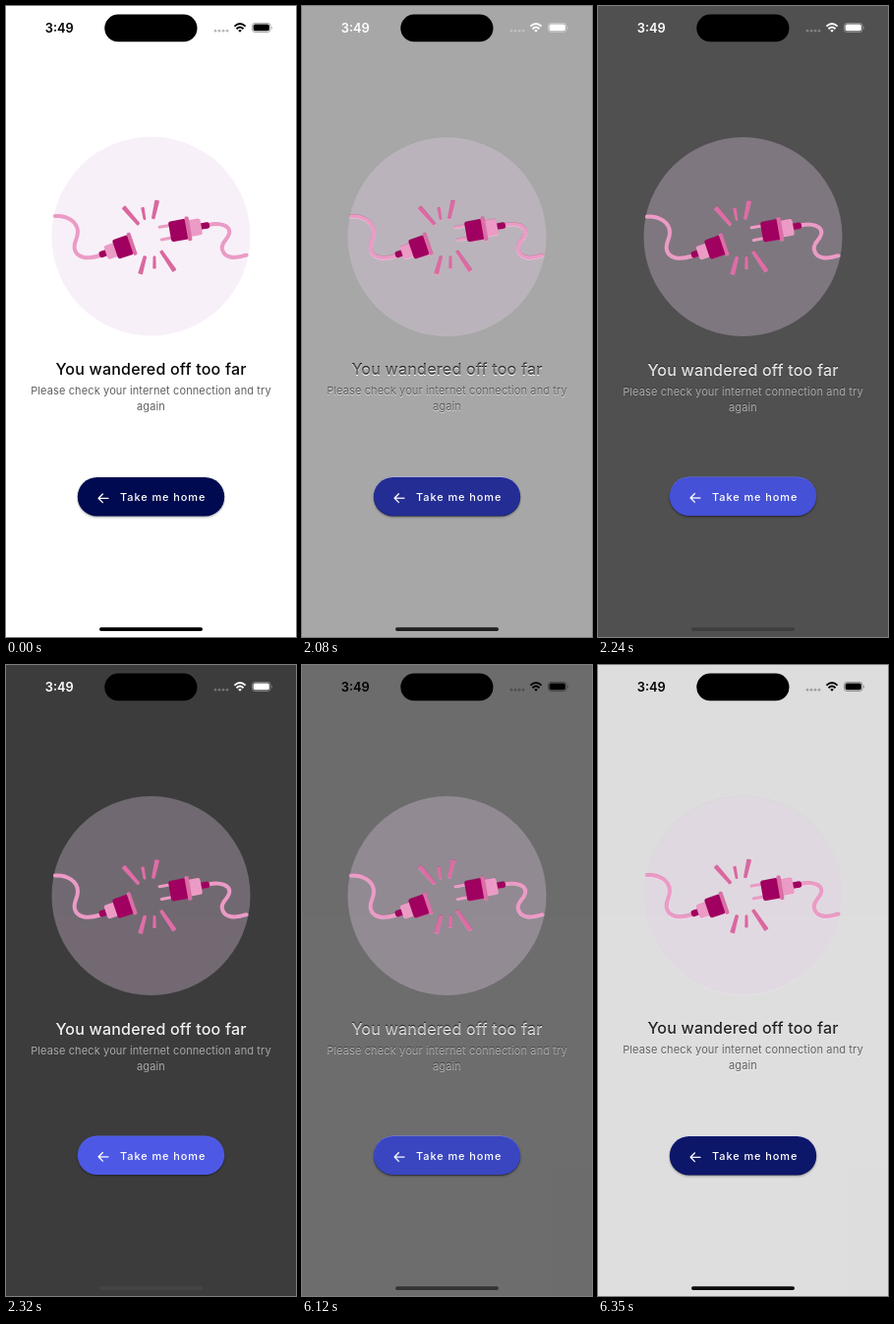
Recreate the animation shown at these times as an HTML page. Size 295 by 640 pixels, loop 6430 ms.

```html
<!DOCTYPE html>
<html lang="en">
<head>
<meta charset="utf-8">
<title>You wandered off too far</title>
<style>
  html, body { margin: 0; width: 100%; height: 100%; overflow: hidden; background: #fff; }
  svg { display: block; width: 100%; height: 100%; }
  text { font-family: Inter, "Open Sans", sans-serif; }
  .light {
    --bg: #fff; --disc: #f8f0f8; --title: #050505; --body: #606060;
    --button: #000a50; --spark: #d9689f; --home: #000;
  }
  .dark {
    --bg: #2f2f2f; --disc: #686068; --title: #fff; --body: #a9a9a9;
    --button: #5360f0; --spark: #e06ea8; --home: #4a4a4a;
  }
  .bg { fill: var(--bg); }
  .disc { fill: var(--disc); }
  .title { fill: var(--title); font-size: 16px; font-weight: 500; letter-spacing: .2px; text-anchor: middle; }
  .body { fill: var(--body); font-size: 11px; letter-spacing: .12px; text-anchor: middle; }
  .button { fill: var(--button); filter: drop-shadow(0 1px 1px rgba(0, 0, 0, .35)); }
  .label { fill: #fff; font-size: 11px; font-weight: 500; letter-spacing: .9px; }
  .arrow { fill: none; stroke: #fff; stroke-width: 1.3; stroke-linecap: round; stroke-linejoin: round; }
  .cord { fill: none; stroke: #eb9bc5; stroke-width: 4; stroke-linecap: round; }
  .pink { fill: #eb9bc5; }
  .rim { fill: #db6fa6; }
  .plum { fill: #a0005f; }
  .spark { fill: var(--spark); stroke: var(--spark); stroke-width: 2; stroke-linejoin: round; }
  .home { fill: var(--home); }
  .clock { font-size: 12.8px; font-weight: 600; }
</style>
</head>
<body>
<svg id="stage" viewBox="0 0 295 640" xmlns="http://www.w3.org/2000/svg"></svg>
<script>
const LOOP = 6430;

// A rounded bar, slightly wider at its outer end.
function spark(x1, y1, x2, y2, wide, narrow) {
  const length = Math.hypot(x2 - x1, y2 - y1);
  const nx = (y1 - y2) / length, ny = (x2 - x1) / length;
  const corner = (x, y, offset) => `${x + nx * offset},${y + ny * offset}`;
  const points = [
    corner(x1, y1, wide), corner(x2, y2, narrow),
    corner(x2, y2, -narrow), corner(x1, y1, -wide)
  ];
  return `<polygon class="spark" points="${points.join(' ')}"/>`;
}

// A block centred on the plug's axis.
const block = (kind, x, width, height, radius) =>
  `<rect class="${kind}" x="${x}" y="${-height / 2}" width="${width}" height="${height}" rx="${radius}"/>`;

const illustration = `
  <path class="cord" d="M50 213C62 212 73 219 73 229C73 237 68 240 70 247C72 255 82 257.5 96 253"/>
  <path class="cord" d="M206 222C218 219 229 223 227 231C225 238 218 240 220 247C222 255 231 257 244.5 252.7"/>
  <g transform="translate(95 252.7) rotate(-19)">
    ${block('plum', 0, 10, 6.5, 2.5)}
    ${block('pink', 7, 12, 14.5, 2.5)}
    ${block('plum', 17, 17, 20.5, 2.5)}
    ${block('rim', 33, 4, 24, 1.6)}
  </g>
  <g transform="translate(176 227.5) rotate(-10)">
    <path d="M-19 -6.6H-7M-19 6.2H-7" stroke="#eb9bc5" stroke-width="3" stroke-linecap="round"/>
    ${block('plum', 21, 10.5, 6.5, 2.5)}
    ${block('pink', 10, 13, 17, 2.5)}
    ${block('plum', -9.5, 18, 21, 2.5)}
    ${block('rim', 7.5, 4.2, 25, 1.6)}
  </g>
  ${spark(120, 204.5, 134.5, 221, 1.4, .8)}
  ${spark(139, 205, 141, 216, .7, .4)}
  ${spark(153.6, 198, 149.8, 215, 1.4, .8)}
  ${spark(136.8, 271, 141.3, 254.5, 1.4, .8)}
  ${spark(151, 265.5, 151, 254.5, .7, .4)}
  ${spark(171, 268, 158, 249, 1.4, .8)}`;

// Light and dark layouts differ by a fraction of a pixel.
const screen = (theme, drop, lift) => `
  <g class="${theme}" id="${theme}">
    <rect class="bg" width="295" height="640"/>
    <g transform="translate(0 ${drop / 2})">
      <circle class="disc" cx="147.5" cy="233.5" r="101"/>
      ${illustration}
    </g>
    <text class="title" x="147.5" y="${374 + drop}">You wandered off too far</text>
    <text class="body" x="147.5" y="${394.3 + drop}">Please check your internet connection and try</text>
    <text class="body" x="147.5" y="${410.3 + drop / 2}">again</text>
    <g transform="translate(0 ${-lift})">
      <rect class="button" x="72.8" y="478" width="149.4" height="39.6" rx="19.8"/>
      <path class="arrow" d="M104 499.3H94.2M98.4 495L94.1 499.3L98.4 503.6"/>
    </g>
    <text class="label" x="116" y="502">Take me home</text>
    <rect class="home" x="95" y="630.2" width="105" height="3.8" rx="1.9"/>
  </g>`;

const dots = [213, 217, 221, 225]
  .map(x => `<circle cx="${x}" cy="25.2" r="1.35"/>`).join('');

const statusBar = `
  <g id="status" fill="currentColor" color="#000">
    <text class="clock" x="39.8" y="26.8">3:49</text>
    <g opacity=".28">${dots}</g>
    <g fill="none" stroke="currentColor" stroke-width="1.9">
      <path d="M232.4 20.6Q238 15.4 243.6 20.6"/>
      <path d="M234.5 23.2Q238 20 241.5 23.2"/>
    </g>
    <path d="M236.2 24.8Q238 23.4 239.8 24.8L238 26.8Z"/>
    <rect x="250.4" y="17.4" width="18.6" height="9" rx="2.8" fill="none" stroke="currentColor" stroke-width=".9" opacity=".4"/>
    <rect x="251.6" y="18.6" width="16.2" height="6.6" rx="1.7"/>
    <path d="M270 20.4Q271.5 21.9 270 23.4Z" opacity=".45"/>
  </g>
  <rect x="100.3" y="8.6" width="94.2" height="27.6" rx="13.8"/>`;

document.getElementById('stage').innerHTML =
  screen('light', 0, 0) + screen('dark', 1, .5) + statusBar;

// Each row of a table is [start in ms, value], held until the next row.
function hold(id, property, table) {
  const frames = table.map(([time, value]) =>
    ({ offset: time / LOOP, [property]: value, easing: 'steps(1, end)' }));
  frames.push({ offset: 1, [property]: table[0][1] });
  document.getElementById(id).animate(frames, { duration: LOOP, iterations: Infinity });
}

hold('dark', 'opacity', [
  [0, 0], [2000, .14], [2080, .42], [2160, .68], [2240, .84], [2320, .937],
  [5880, 1], [5960, .97], [6040, .87], [6120, .705], [6190, .5], [6270, .31], [6350, .16]
]);
hold('status', 'color', [[0, '#000'], [2080, '#fff'], [6040, '#000']]);
</script>
</body>
</html>
```
